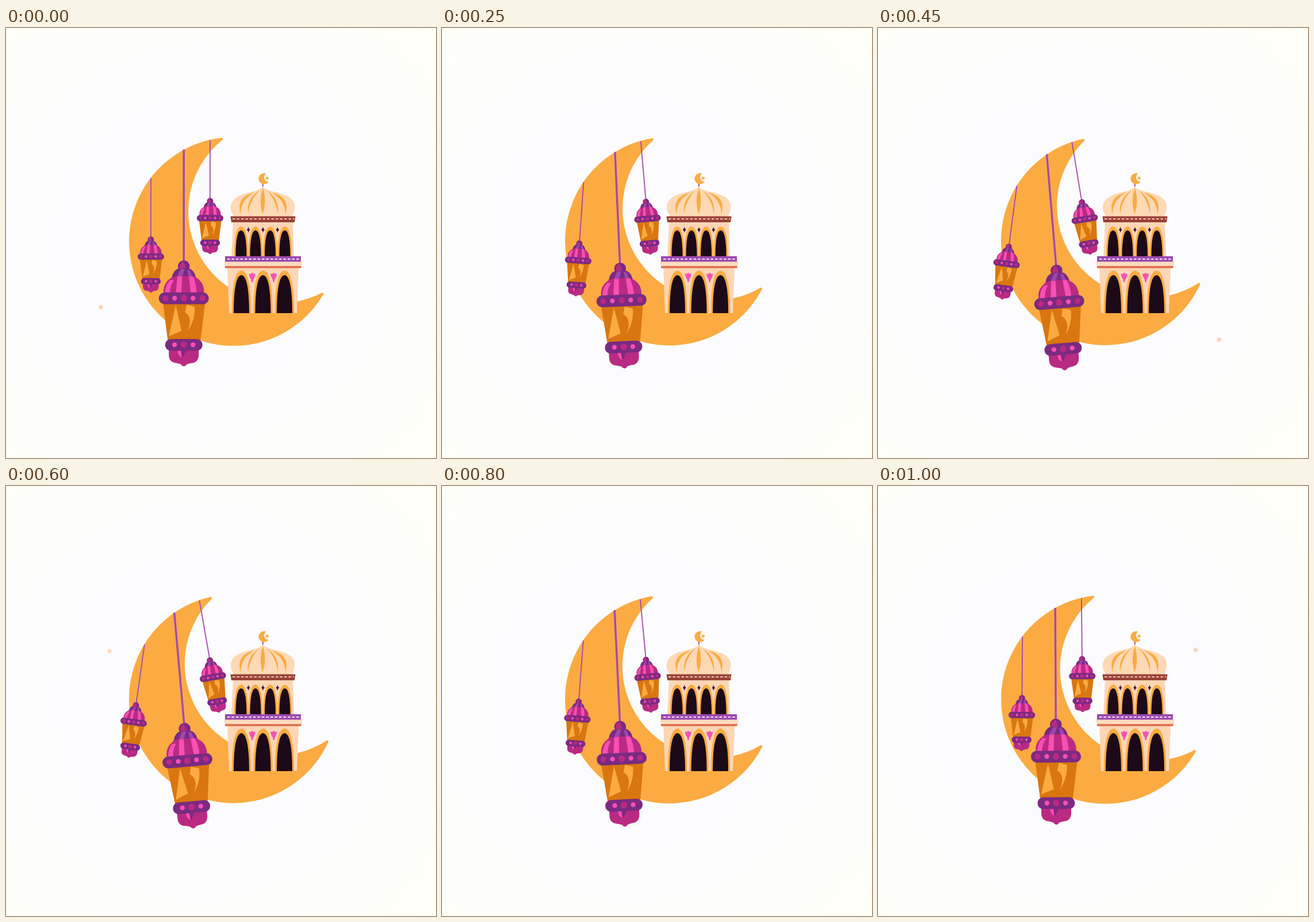
An HTML page that plays this animation: 748 by 748 pixels, repeating every 1050 ms.

```html
<!DOCTYPE html>
<html lang="en">
<head>
<meta charset="utf-8">
<title>Crescent and lanterns</title>
<style>
html, body { margin: 0; width: 100%; height: 100%; overflow: hidden; }
body { background: radial-gradient(circle at 45% 50%, #fcfcfe 45%, #fefff7 100%); }
svg { display: block; width: 100vw; height: 100vh; }
</style>
</head>
<body>
<svg viewBox="0 0 748 748">
  <defs>
    <!-- Lantern: origin at the top of the knob -->
    <g id="lantern">
      <circle cy="9.5" r="10.3" fill="#7b2a82"/>
      <path d="M-7 14Q-9 4 -1 1Q4 8 3 17Z" fill="#b92a82"/>
      <path d="M-21 29Q-18 15 -8 13H8Q18 15 21 29Z" fill="#7b2a82"/>
      <path d="M-12 28L-5 14H2L-3 28ZM8 28L6 15L11 17L15 28Z" fill="#9c47ae"/>
      <path d="M-35 57Q-37 41 -24 31Q-19 26.500 -10 26.500H10Q24 27 31 38Q36 46 35 57Z" fill="#b92a82"/>
      <path d="M-23 33Q-32 41 -33 56H-24Q-24 43 -17 34ZM-11 27H-3L-4 56H-14ZM9 27H16Q22 39 22 56H12Z" fill="#f84fb4"/>
      <path d="M-36 74H37L29 138H-28Z" fill="#d9760f"/>
      <path d="M-14 77L-26 131L-4 122ZM5 76L19 80Q20 103 6 123Q17 99 2 89Z" fill="#fbab42"/>
      <rect x="-43.500" y="55" width="87" height="20.500" rx="10" fill="#7b2a82"/>
      <g fill="#b92a82">
        <circle cx="-32" cy="65" r="5"/><circle cy="65" r="5.700"/><circle cx="32" cy="65" r="5"/>
        <path d="M-26 155H26V164Q25 178 12 178L5 180Q3 183.500 0 183.500Q-3 183.500 -5 180L-12 178Q-26 177 -26 164Z"/>
      </g>
      <path d="M-5 156H4L-2 168Z" fill="#7b2a82"/>
      <path d="M-11 156H-5L-4 168Q-10 166 -11 156Z" fill="#f84fb4"/>
      <rect x="-32.500" y="136" width="65" height="20.500" rx="10" fill="#7b2a82"/>
      <circle cy="146" r="5.700" fill="#b92a82"/>
      <g fill="#f84fb4">
        <circle cx="-16" cy="65" r="4.200"/><circle cx="16" cy="65" r="4.200"/>
        <circle cx="-16" cy="146" r="4.200"/><circle cx="16" cy="146" r="4.200"/>
      </g>
    </g>
  </defs>
  <g id="moon">
    <path d="M375.300 193A179.500 179.500 0 1 0 550.300 462.500A161.500 161.500 0 0 1 375.300 193Z"
      fill="#fbab42" stroke="#fbab42" stroke-width="4" stroke-linejoin="round"/>
  </g>
  <g id="tower"></g>
  <g id="sparks"></g>
</svg>
<script>
const $ = id => document.getElementById(id);
const ORANGE = '#fbab42', PEACH = '#fdd6b6', DARK = '#1d0a18';
const path = (d, fill) => `<path d="${d}" fill="${fill}"/>`;
const arch = (c, top, base, w, fill) => {
  const k = top + (base - top) * .3;
  return path(`M${c - w} ${base}C${c - w} ${k} ${c - w * .6} ${top} ${c} ${top}` +
    `S${c + w} ${k} ${c + w} ${base}Z`, fill);
};
const dashes = (x1, x2, y, colour) =>
  `<path d="M${x1} ${y}H${x2}" stroke="${colour}" stroke-width="1.8" stroke-dasharray="4.500 3"/>`;

function drawTower() {
  const stripes = path('M447 278Q439 302 446.500 324Q454 302 447 278Z' +
    'M441 282Q418 297 421 323Q425 298 441 282ZM453 282Q476 297 473 323Q469 298 453 282Z' +
    'M432 286Q399 293 408 325Q408 299 432 286ZM462 286Q495 293 486 325Q486 299 462 286Z', ORANGE);
  let star = '';
  for (let i = 0; i < 10; i++) {
    const r = i % 2 ? 1.7 : 4.2, a = i * Math.PI / 5 - 1.3;
    star += `${i ? 'L' : 'M'}${454.3 + r * Math.cos(a)} ${261.2 + r * Math.sin(a)}`;
  }
  const gem = x => path(`M${x} 346Q${x + .8} 350 ${x + 3} 351Q${x + .8} 352 ${x} 356` +
    `Q${x - .8} 352 ${x - 3} 351Q${x - .8} 350 ${x} 346Z`, '#3d1538');
  const tulip = x => path(`M${x - 5.5} 427L${x - 2.5} 428L${x} 425.500L${x + 2.5} 428L${x + 5.5} 427` +
    `Q${x + 5} 434 ${x + 2} 437L${x + 1} 442H${x - 1}L${x - 2} 437Q${x - 5} 434 ${x - 5.5} 427Z`, '#f553b3');
  const upper = [409, 434, 459.5, 485], lower = [409.5, 447, 484.5];
  $('tower').innerHTML =
    path('M446 270H447.500V278H446Z', '#6b2a70') +
    path('M452.500 253.300A9.500 9.500 0 1 0 456.800 267.300A7.600 7.600 0 0 1 452.500 253.300Z', ORANGE) +
    path(star + 'Z', ORANGE) +
    path('M447 275C451 284 471 284 487 291C501 297 505 309 501 319Q500 325 497 328H397' +
      'Q394 325 392 319C388 307 394 297 407 291C423 284 443 284 447 275Z', '#fdd9b5') + stripes +
    path('M395 337H499L501 398H392Z', PEACH) +
    path('M390.500 327.500H503.500L502 338H392Z', '#9b4238') + dashes(394, 501, 332.2, '#fde0cc') +
    upper.map(x => arch(x, 345.5, 397, 12.3, ORANGE) + arch(x, 352, 397, 9.5, DARK)).join('') +
    [421.7, 447, 472.3].map(gem).join('') +
    path('M385 416H509L506 496H388Z', PEACH) +
    path('M379 406H516L514 415H381Z', '#fddcc0') +
    path('M381 414H513.500V417.700H381Z', '#e0704c') +
    path('M381 397H513V406.500H381Z', '#9c4ab0') + dashes(385, 510, 402, '#fbe6f4') +
    lower.map(x => arch(x, 422, 496, 16.8, ORANGE) + arch(x, 430, 496, 13.5, DARK)).join('') +
    [428.3, 465.7].map(tulip).join('');
}

// x, top of string, string length, size, local swing in degrees
const lanterns = [
  [252, 261, 102, .53, 14.25],
  [355, 195, 101, .53, -3.95],
  [309.3, 211.5, 193.5, 1, 1]
].map(([x, y, len, size, swing]) => {
  const g = document.createElementNS('http://www.w3.org/2000/svg', 'g');
  g.innerHTML = `<path d="M${x} ${y}v${len + 2}" stroke="#a249b0" stroke-width="${size < 1 ? 1.8 : 3.4}"/>` +
    `<use href="#lantern" transform="translate(${x} ${y + len}) scale(${size})"/>`;
  $('moon').append(g);
  return { g, x, y, swing };
});

// x, y, first step, step after the last, colour
const sparks = [
  [165, 485.5, 0, 4, '#fcd5b4'],
  [593.3, 542, 7, 11, '#fcd0c0'],
  [180, 287.3, 11, 15, '#f9dac3'],
  [552.5, 285, 18, 21, '#fbd3b9']
];

const STEP = 50, LOOP = 1050, TILT = -6.15;
const sway = [0, .06, .15, .26, .375, .49, .605, .72, .83, .93, .98, 1,
  .985, .91, .8, .67, .535, .4, .27, .15, .057];

function draw(now) {
  const step = Math.floor(now % LOOP / STEP), k = sway[step];
  $('moon').setAttribute('transform', `rotate(${TILT * k} 383.500 372.500)`);
  for (const { g, x, y, swing } of lanterns)
    g.setAttribute('transform', `rotate(${swing * k} ${x} ${y})`);
  $('sparks').innerHTML = sparks.filter(s => step >= s[2] && step < s[3])
    .map(s => `<circle cx="${s[0]}" cy="${s[1]}" r="3.700" fill="${s[4]}"/>`).join('');
}

drawTower();
const start = performance.now();
function tick() {
  draw(performance.now() - start);
  requestAnimationFrame(tick);
}
tick();
</script>
</body>
</html>
```
